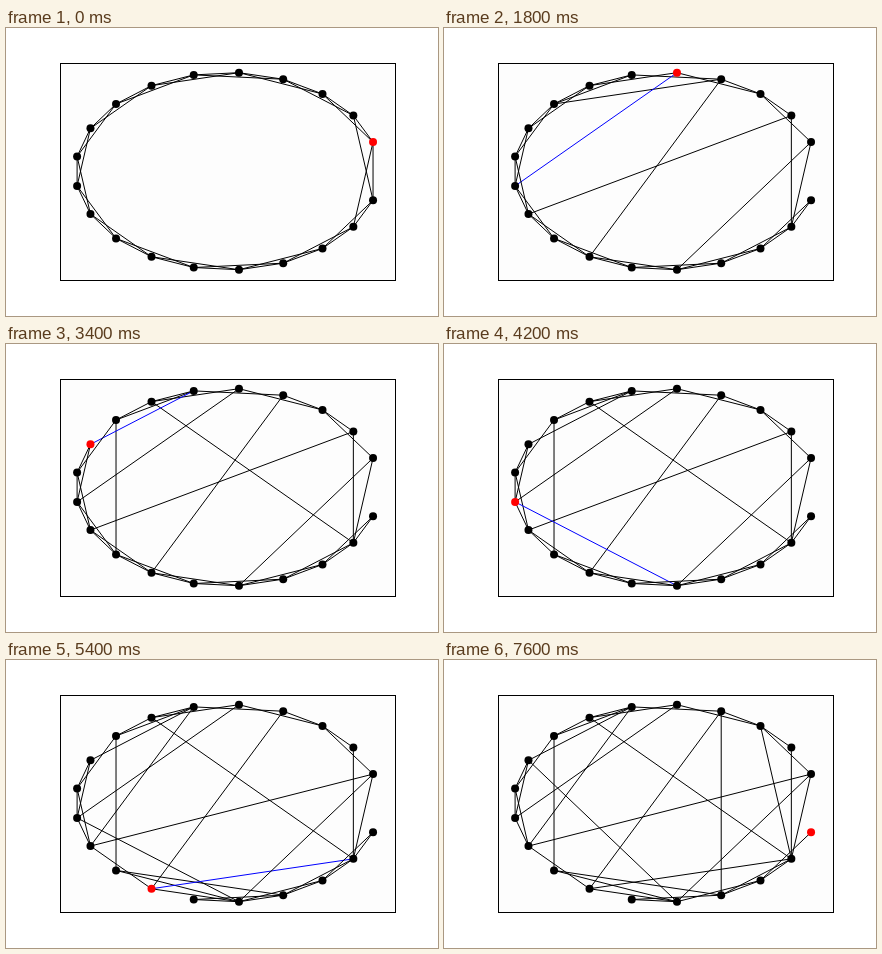
Animation, 432 px wide and 288 px high, one loop 8 s. Source, as an HTML page with a canvas:

```html
<!DOCTYPE html>
<html lang="en">
<head>
<meta charset="utf-8">
<title>Small-world rewiring</title>
<style>
  html, body { margin: 0; width: 100%; height: 100%; overflow: hidden; background: #fff; }
  canvas { display: block; }
</style>
</head>
<body>
<canvas id="stage" width="432" height="288"></canvas>
<script>
const ctx = document.getElementById('stage').getContext('2d');
const COUNT = 20, STEP_MS = 200, LOOP_MS = 8000;

// The ring has one empty slot at angle 0.
const nodes = Array.from({ length: COUNT }, (_, i) => {
  const angle = (i + 1) * 2 * Math.PI / (COUNT + 1);
  return [221.6 + 152.2 * Math.cos(angle), 143.2 - 98.8 * Math.sin(angle)];
});

// [node, old neighbour, new neighbour]
const rewirings = [
  [0, 19, 15], [1, 0, 11], [1, 19, 18], [3, 1, 13], [3, 4, 7], [4, 5, 10],
  [6, 8, 18], [7, 3, 12], [8, 7, 5], [10, 12, 15], [11, 1, 0], [11, 12, 5],
  [12, 13, 16], [12, 14, 15], [13, 14, 18], [15, 10, 8], [16, 15, 3], [18, 19, 2]
];

function edgesAt(step) {
  const edges = [];
  for (let i = 0; i < COUNT; i++) {
    for (const d of [1, 2]) edges.push({ a: i, b: (i + d) % COUNT, color: '#000' });
  }
  for (const [node, from, to] of rewirings) {
    const turn = 2 * node + 1;
    if (step < turn) break;
    const edge = edges.find(({ a, b }) =>
      (a === node && b === from) || (a === from && b === node));
    Object.assign(edge, { a: node, b: to, color: step === turn ? '#00f' : '#000' });
  }
  return edges;
}

function draw(step) {
  ctx.fillStyle = '#fff';
  ctx.fillRect(0, 0, 432, 288);
  ctx.fillStyle = '#fdfdfd';
  ctx.fillRect(54, 35, 336, 218);
  ctx.lineWidth = 1;
  ctx.strokeStyle = '#000';
  ctx.strokeRect(54.5, 35.5, 335, 217);

  for (const { a, b, color } of edgesAt(step)) {
    ctx.strokeStyle = color;
    ctx.beginPath();
    ctx.moveTo(...nodes[a]);
    ctx.lineTo(...nodes[b]);
    ctx.stroke();
  }

  const active = Math.floor(step / 2);
  nodes.forEach(([x, y], i) => {
    ctx.fillStyle = i === active ? '#f00' : '#000';
    ctx.beginPath();
    ctx.arc(x, y, 4, 0, 2 * Math.PI);
    ctx.fill();
  });
}

const start = performance.now();
function tick() {
  const time = (performance.now() - start) % LOOP_MS;
  draw(Math.floor(time / STEP_MS));
  requestAnimationFrame(tick);
}
tick();
</script>
</body>
</html>
```
